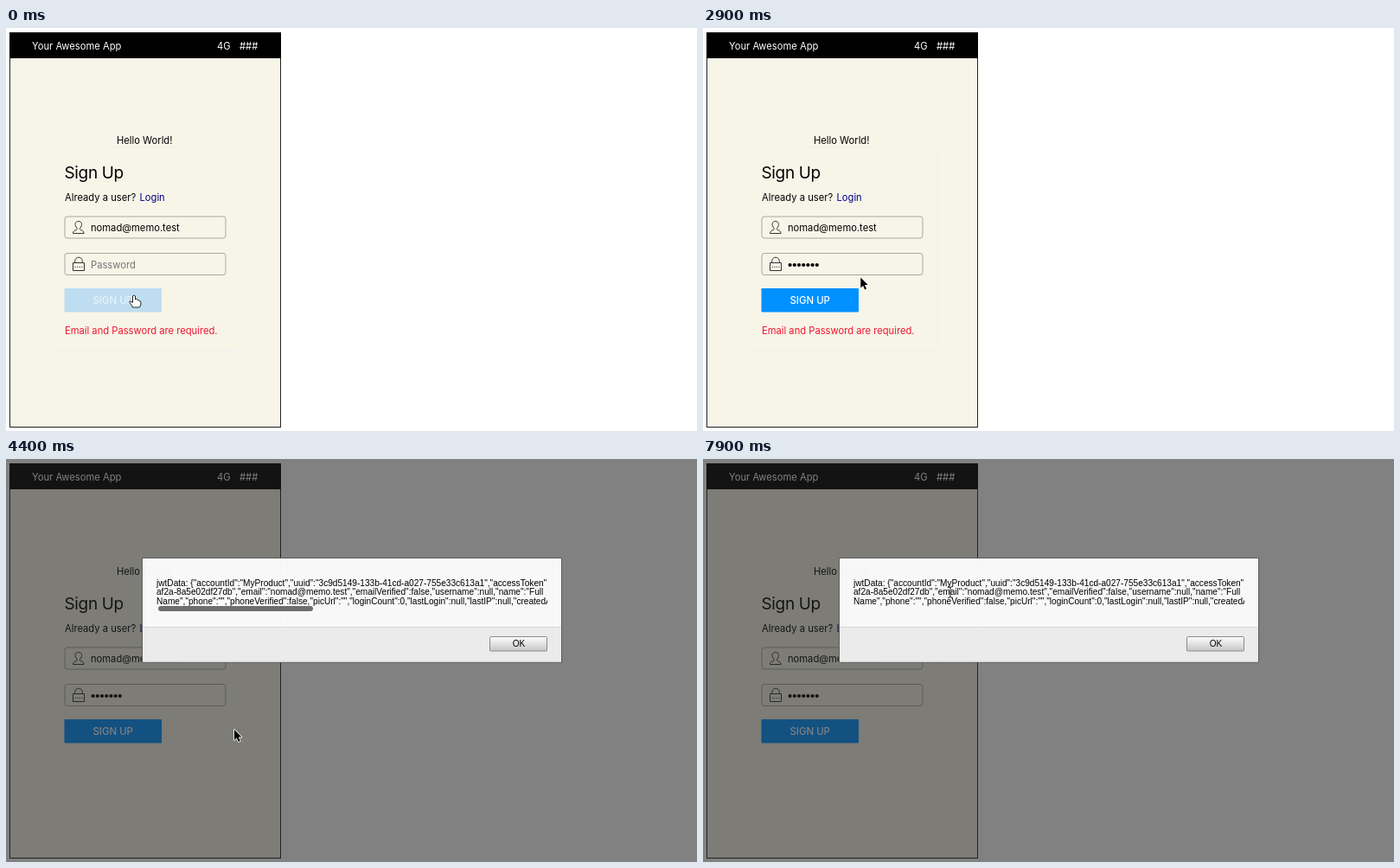
These frames come from a looping animation (799 by 466 pixels, 8000 ms). An HTML page:

```html
<!DOCTYPE html>
<html lang="en">
<head>
<meta charset="utf-8">
<title>Sign up</title>
<style>
html, body { margin: 0; width: 100%; height: 100%; overflow: hidden; background: #fff; }
svg { display: block; }
text { font: 11.2px Inter, "Open Sans", sans-serif; white-space: pre; }
.title { font-size: 19px; letter-spacing: -.35px; }
.label { font-size: 11.4px; font-weight: 500; fill: #fff; text-anchor: middle; }
.box { fill: none; stroke: #a8a8a0; }
.icon { fill: none; stroke: #333; }
.alert text { font: 10.12px "Liberation Sans", Arial, sans-serif; }
</style>
</head>
<body>
<svg width="799" height="466" viewBox="0 0 799 466">
  <defs>
    <linearGradient id="shine" x2="0" y2="1">
      <stop stop-color="#fdfdfd"/><stop offset="1" stop-color="#c6c6c6"/>
    </linearGradient>
    <clipPath id="pane"><path d="M170 130H626V180H170z"/></clipPath>
  </defs>

  <rect x="4.5" y="5.5" width="313" height="456" fill="#f7f5e8" stroke="#222"/>
  <path d="M4 5H318V35H4z"/>
  <g fill="#fff">
    <text x="30" y="25">Your Awesome App</text>
    <text x="244" y="25">4G</text>
    <text x="270" y="25">###</text>
  </g>

  <text x="128" y="134">Hello World!</text>
  <rect x="50.5" y="137.5" width="220" height="236" rx="5" fill="none" stroke="#f1f1ed"/>
  <text class="title" x="67.5" y="174">Sign Up</text>
  <text x="68" y="200">Already a user? <tspan x="154.5" fill="#000084">Login</tspan></text>

  <rect class="box" x="68" y="218" width="186" height="25" rx="3"/>
  <path class="icon" d="M77.5 237.5c0-3 2-3.2 4-4 1-.5.8-1.5.3-2.3-1.3-1.7-1.9-3-1.7-4.7.2-2 1.8-3 3.7-3s3.5 1 3.7 3c.2 1.7-.4 3-1.7 4.7-.5.8-.7 1.8.3 2.3 2 .8 4 1 4 4z"/>
  <text x="98" y="235">nomad@memo.test</text>

  <rect class="box" x="68" y="260.5" width="186" height="25" rx="3"/>
  <path class="icon" d="M77.5 271.5h13v9h-13zM79.7 271.5v-2a4.3 4.3 0 0 1 8.6 0v2M79.5 276.3h1.2m1.4 0h1.2m1.4 0h1.2m1.4 0h1.2"/>
  <text id="hint" x="98" y="278" fill="#757575">Password</text>
  <g id="dots"></g>
  <path id="caret" d="M.5 266V281" stroke="#000"/>

  <rect id="button" x="67.5" y="301" width="112.5" height="27.5" rx="1"/>
  <text id="label" class="label" x="123.7" y="319"></text>
  <text id="error" x="68" y="353.5" fill="#f0142f">Email and Password are required.</text>

  <g id="alert" class="alert">
    <path d="M0 0H799V466H0z" fill="#232323" fill-opacity=".57"/>
    <rect x="157.5" y="114.5" width="485" height="120.5" fill="#fdfdfd" fill-opacity=".96" stroke="#5c5c5c"/>
    <path d="M158 194.5H642V234.5H158z" fill="#ebebeb"/>
    <path d="M158 194.5H642" stroke="#d8d8d8"/>
    <g clip-path="url(#pane)">
      <text x="174" y="146.5">jwtData: {"accountId":"MyProduct","uuid":"3c9d5149-133b-41cd-a027-755e33c613a1","accessToken"</text>
      <text x="174" y="157">af2a-8a5e02df27db","email":"nomad@memo.test","emailVerified":false,"username":null,"name":"Full</text>
      <text x="174" y="167.5">Name","phone":"","phoneVerified":false,"picUrl":"","loginCount":0,"lastLogin":null,"lastIP":null,"createdAt"</text>
    </g>
    <rect id="bar" x="176" y="170" width="179" height="6" rx="3" fill="#6e6e6e"/>
    <rect x="559.5" y="205.5" width="66" height="16.5" rx="1" fill="url(#shine)" stroke="#8c8c8c"/>
    <text x="593" y="216.5" text-anchor="middle">OK</text>
  </g>

  <g id="cursor" stroke-linejoin="round">
    <path id="hand" fill="#fff" stroke="#222" d="M-1.5 1Q0-1 1.5 1V5l1-.6q1.6.2 1.6 1.2 2-.4 2 1 2 0 1.8 1.5V10q0 2-1.5 4H-1.5Q-2 12-5 8.5-5.8 6.5-4 7L-1.5 8.5z"/>
    <path id="arrow" stroke="#fff" paint-order="stroke" stroke-width="1.6" d="M0 0V12l2.8-2.6 2 4.6 2-.9-2-4.5H8.5z"/>
    <path id="beam" fill="none" stroke="#222" d="M-3-6.5Q0-6.5 0-5V5Q0 6.5-3 6.5M3-6.5Q0-6.5 0-5M0 5Q0 6.5 3 6.5"/>
  </g>
</svg>

<script>
const LOOP = 8000, STEP = 100;
const $ = id => document.getElementById(id);
const show = (id, on) => $(id).style.display = on ? '' : 'none';
const ramp = (t, a, b) => Math.min(1, Math.max(0, (t - a) / (b - a)));
const mix = (a, b, k) => a.map((v, i) => v + (b[i] - v) * k);

const keys = [1000, 1300, 1500, 1600, 2000, 2200, 2400];
const PALE = [190, 221, 240], BLUE = [0, 144, 255], LIGHT = [43, 160, 255];

// pointer stops: time, x, y
const path = [
  [0, 148, 309], [200, 152, 309], [700, 215, 273], [2700, 215, 273],
  [3200, 122, 317], [4000, 122, 317], [4300, 213, 311], [4400, 264, 313],
  [4700, 264, 313], [5100, 503, 299], [5500, 503, 299], [6400, 590, 139],
  [6500, 588, 141], [6900, 562, 144], [7300, 617, 144], [7700, 268, 161], [7900, 286, 154]
];
// pointer shape from each time on
const shapes = [
  [0, 'hand'], [400, 'arrow'], [600, 'beam'], [1000, ''], [2800, 'beam'],
  [2900, 'arrow'], [3000, 'hand'], [4200, 'arrow'], [6300, 'beam']
];

$('dots').innerHTML = keys.map((_, i) => `<circle cx="${100.6 + i * 5.2}" cy="274" r="2.1"/>`).join('');

function pointer(t) {
  const i = path.findLastIndex(p => p[0] <= t);
  const a = path[i], b = path[i + 1] || a;
  const k = ramp(t, a[0], b[0] + (a === b));
  return mix(a, b, k * k * (3 - 2 * k));
}

function draw(t) {
  const typed = keys.filter(k => k <= t).length;
  [...$('dots').children].forEach((d, i) => d.style.display = i < typed ? '' : 'none');
  show('hint', !typed);
  show('caret', t >= 800 && t < 2800 && (t < 1800 || t >= 2000));
  $('caret').setAttribute('transform', `translate(${Math.floor(97.6 + 5.15 * typed)})`);

  const on = ramp(t, 900, 1300);
  const hover = ramp(t, 2900, 3200) - ramp(t, 4000, 4300);
  $('button').setAttribute('fill', `rgb(${mix(mix(PALE, BLUE, on), LIGHT, hover).map(Math.round)})`);
  $('label').style.opacity = .65 + .35 * on;
  $('label').textContent = t >= 3300 && t < 4200 ? 'SUBMITTING...' : 'SIGN UP';
  show('error', t < 4200);

  show('alert', t >= 4400);
  $('bar').style.opacity = 1 - ramp(t, 4700, 5100);

  const shape = shapes.findLast(s => s[0] <= t)[1];
  for (const id of ['hand', 'arrow', 'beam']) show(id, id === shape);
  const [, x, y] = pointer(t);
  $('cursor').setAttribute('transform', `translate(${x} ${y})`);
}

const start = performance.now();
function tick() {
  const t = (performance.now() - start) % LOOP;
  draw(Math.floor(t / STEP) * STEP);
  requestAnimationFrame(tick);
}
tick();
</script>
</body>
</html>
```
